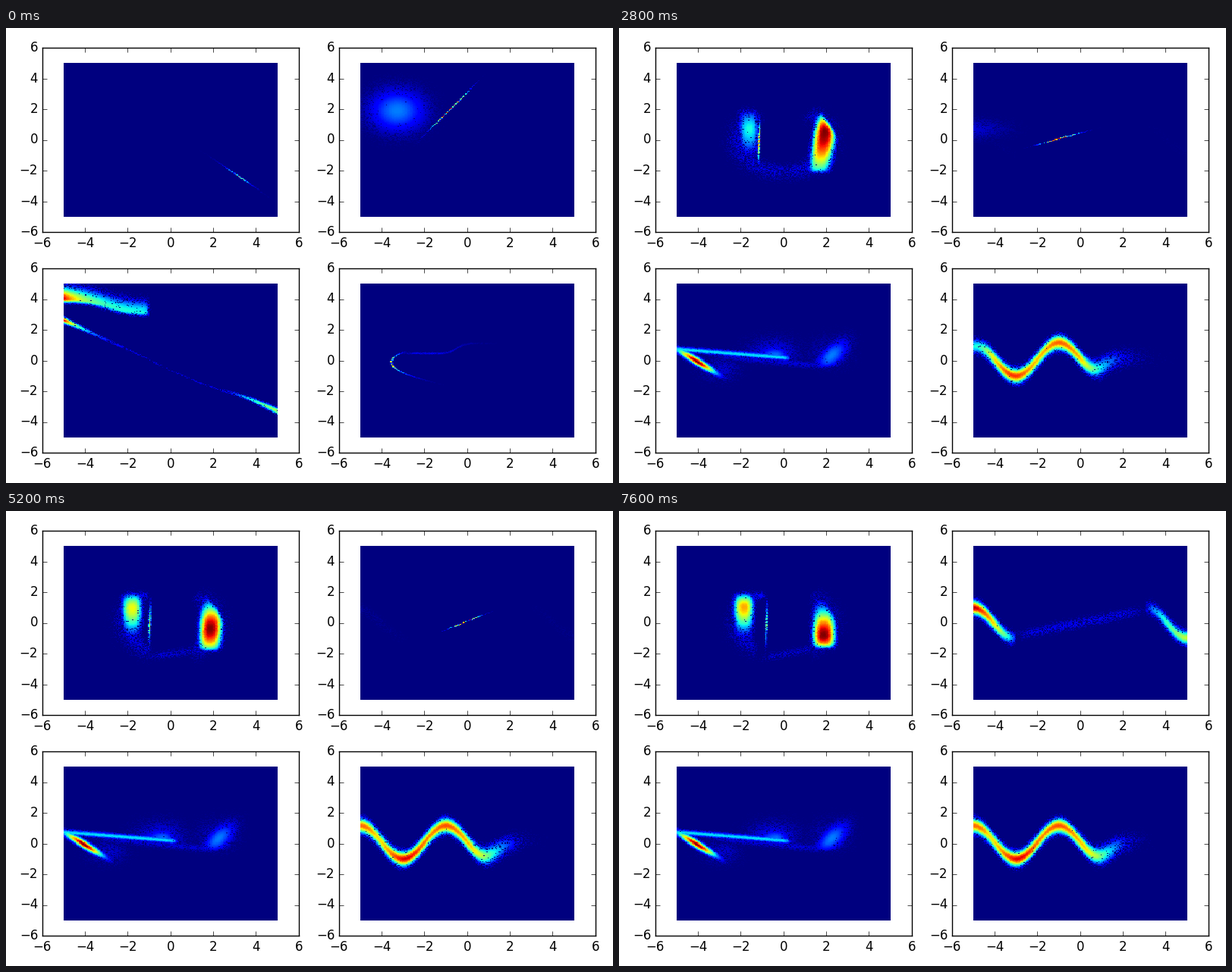
Animation of 800x600 px, one loop 8 s. Source, as a matplotlib script:

```python
import numpy as np
import matplotlib.pyplot as plt
from matplotlib.animation import FuncAnimation

plt.rcParams.update({
    "font.family": "DejaVu Sans", "font.size": 12, "text.kerning_factor": 6,
    "axes.linewidth": 1.0, "xtick.top": True, "ytick.right": True,
    "ytick.alignment": "center",
})
for axis in ("xtick", "ytick"):
    plt.rcParams.update({f"{axis}.direction": "in", f"{axis}.major.size": 4,
                         f"{axis}.major.width": 0.5, f"{axis}.major.pad": 4,
                         f"{axis}.labelsize": 12})

FRAMES, INTERVAL = 20, 400
BINS, LIMIT = 200, 5
STEP = 2 * LIMIT / BINS
CENTRES = -LIMIT + STEP * (np.arange(BINS) + 0.5)
GRID = np.array(np.meshgrid(CENTRES, CENTRES))


def ramp(n, begin, end):
    return float(np.clip((n - begin) / (end - begin), 0, 1))


def mix(a, b, t):
    return a + (b - a) * t


def bell(u, centre, low, high=None, power=2):
    """Bump with a separate width on each side."""
    d = u - centre
    width = np.where(d < 0, low, low if high is None else high)
    return np.exp(-0.5 * np.abs(d / width) ** power)


def edge(d, softness):
    """Soft step from 0 to 1."""
    return 0.5 + 0.5 * np.tanh(d / (2 * softness))


def blend(*layers):
    return np.maximum.reduce(layers)


# Each panel has density functions of (x, y); the values run from 0 to 1.

# --- top left: two upright modes joined by a ring ---------------------------

def modes_start(x, y):
    height = 0.5 * bell(x, 3.2, 0.3) + 0.1 * bell(x, 3.1, 0.7)
    return height * bell(y, 0.65 - 0.95 * x, 0.025)


def ring_haze(x, y):
    return 0.09 * bell(np.hypot(x, y), 2.05, 0.35, 0.45) * edge(np.abs(x) - 0.65 * y, 0.12)


def modes_early(x, y):
    flare = edge(y - 0.6, 0.35)
    column = (0.62 * edge(y + 1.95, 0.06) * bell(y, -0.6, 9, 1.4)
              * bell(x, 1.85 - 0.15 * flare, 0.18 + 0.32 * flare, power=3))
    core = 0.97 * bell(y, -0.8, 0.9, power=4) * bell(x, 1.93 + 0.05 * np.sin(2 * y), 0.07)
    floor = (0.3 + 0.25 * edge(x - 1.4, 0.2)) * bell(x, 0.2, 1.8, power=12) * bell(y, -1.85 - 0.11 * x, 0.08)
    stub = 0.32 * bell(x, -1.45, 0.1) * bell(y, -1.85, 0.25, 0.12)
    fan = 0.2 * bell(x, -1.6, 0.6, 0.1) * bell(y, -3.95 - 1.5 * x, 0.28)
    glow = 0.12 * bell(x, 0.2, 1.4, power=4) * bell(y, -1.8, 0.1, 0.35)
    return blend(column, core, floor, stub, fan, glow, ring_haze(x, y))


def modes_late(x, y, n):
    t, fall = ramp(n, 7, 15), ramp(n, 9, 15)
    left = (mix(0.38, 0.73, t) * bell(x, mix(-1.6, -1.84, t), 0.36, 0.32, power=3)
            * bell(y, mix(0.7, 1.05, t), 1.0, mix(0.85, 0.6, t)) * edge(1.95 - y, 0.12))
    right = (bell(x, 1.86 + 0.12 * (1 - fall) * y, 0.36, 0.42, power=3)
             * bell(y, mix(0.55, -0.8, fall), mix(1.9, 0.75, fall), mix(0.9, 1.1, fall))
             * edge(2.6 - 0.5 * np.maximum(y, 0) - x, 0.07)
             * edge(y + mix(2.1, 1.6, fall), 0.09))
    wall_x = mix(-1.15, -0.8, ramp(n, 7, 19))
    wall = (mix(0.7, 0.4, t) * bell(y, -0.1, 0.7) + 0.12 * bell(y, -0.1, 1.5, power=6)) \
        * bell(x, wall_x + 0.02 * y, 0.03)
    cap = 0.13 * bell(x, wall_x - 0.4, 0.5, 0.3, power=4) * bell(y, 1.75, 0.2)
    floor = (0.08 * bell(x, 0.3, 1.2, power=6)
             * bell(y, mix(-1.9, -2.05, t) + 0.27 * t * x, 0.2))
    return blend(left, right, wall, cap, floor, ring_haze(x, y) * edge(np.abs(x) - 1.3 * t, 0.1))


def modes(x, y, n):
    grown, late = ramp(n, 0, 1.5), ramp(n, 4, 7)
    field = blend((1 - grown) * modes_start(x, y),
                  grown * (1 - late) * modes_early(x, y),
                  late * modes_late(x, y, n))
    return field, mix(150, 9, grown)


# --- top right: a tilting line that opens into a wave -----------------------

def wave(x, y, n):
    opened, spread = ramp(n, 13, 15), ramp(n, 15, 19)
    cx = np.interp(n, [0, 4, 8], [-0.82, -3.4, -0.1])
    cy = np.interp(n, [0, 4, 8], [1.95, 0.22, 0.05])
    slope = np.interp(n, [0, 4, 8, 13, 15, 19], [1.39, 0.45, 0.33, 0.53, 0.39, 0.27])
    reach = np.interp(n, [0, 4, 8], [0.55, 0.95, 0.45])
    line = ((1 - opened) * bell(x, cx, reach) * bell(y, cy + slope * (x - cx), 0.014 * np.hypot(1, slope)))
    bridge = 0.1 * opened * bell(x, 0, 2.7, power=8) * bell(y, slope * x, mix(0.1, 0.25, spread))

    cloud = 0.25 * ramp(n, 3, 0) * bell(x, -3.27, 0.85) * bell(y, 1.9, 0.9)
    corner = 0.14 * ramp(n, 0, 4) * ramp(n, 10, 4) * bell(x, -5, 0.4 + 0.1 * n * ramp(n, 4, 7)) \
        * bell(y, mix(1.3, 0.7, ramp(n, 4, 7)), 0.45)

    # The two wings mirror each other through the origin.
    u, side = np.abs(x), np.sign(x)
    begin = mix(2.7, 3.0, spread)
    path = side * 0.97 * np.cos(np.pi / 2 * (u - begin - 0.1) / (3.95 - begin))
    height = np.where(side < 0, 0.97, 0.6) * np.clip((u - begin) / (5 - begin), 0, 1) ** 0.55
    wings = mix(0.025 * ramp(n, 4, 9), 1, opened) * height * bell(y, path, 0.3)
    return blend(line, bridge, cloud, corner, wings), mix(30, 9, opened)


# --- bottom left: folded arms and two clouds --------------------------------

def arms_start(x, y):
    decay = np.exp(-(x + 5) / 0.85)
    sheet = ((0.37 + 0.57 * decay) * edge(-1.05 - x, 0.05)
             * bell(y, 3.55 - 0.45 * np.tanh((x + 3) / 1.1), 0.15, 0.5))
    strand = ((0.08 + 0.87 * decay + 0.5 * edge(x - 3.6, 0.5))
              * bell(y, -0.6 - 0.65 * x + 0.55 * edge(x - 2.6, 0.5), 0.04 + 0.004 * x ** 2))
    return blend(sheet, strand)


def arms_grown(x, y, t):
    upper = (mix(0.77, 0.35, t) * edge(0.25 - x, 0.08)
             * bell(y, 0.17 - mix(0.06, 0.11, t) * x, mix(0.19, 0.1, t), mix(0.23, 0.12, t)))
    mid = mix(-4.3, -4.05, t)
    lower = (bell(x, mid, 0.6, mix(0.9, 0.58, t))
             * bell(y, mix(0.25, -0.05, t) - mix(1.08, 0.8, t) * (x - mid), mix(0.27, 0.17, t)))
    lump = (mix(0.97, 0.24, t) * bell(x, -0.35, 0.6, 0.38)
            * bell(y, 0.28, mix(0.22, 0.17, t), mix(0.42, 0.4, t)))
    lump_haze = mix(0.4, 0.11, t) * bell(x, -0.4, 0.9, 0.75) * bell(y, 0.35, 0.35, 0.75)
    cloud = (mix(0.37, 0.25, t) * bell(x, mix(1.5, 2.1, t) + 0.45 * t * y, mix(0.95, 0.38, t), mix(0.6, 0.42, t))
             * bell(y, mix(-0.1, 0.3, t), 0.6, 0.7)
             * edge(y + mix(0.6 + 0.15 * x, 0.45, t), 0.07))
    cloud_haze = 0.07 * bell(x, 2.3, 0.8, 0.6) * bell(y, 0.4, 0.6, 0.8)
    thread = 0.08 * bell(x, -0.7, 2.6, power=8) * bell(y, -0.1 - 0.14 * x, 0.17)
    tip_haze = 0.07 * bell(x, -2.9, 0.7, 0.6) * bell(y, -0.5, 0.6, 0.5)
    return blend(upper, lower, lump, lump_haze, cloud, cloud_haze, thread, tip_haze)


def arms(x, y, n):
    grown, settled = ramp(n, 0, 2), ramp(n, 4, 7)
    field = blend((1 - grown) * arms_start(x, y), grown * arms_grown(x, y, settled))
    return field, mix(8, 20, settled)


# --- bottom right: a sine band ----------------------------------------------

def band_start(x, y):
    d = y + 0.07
    bend = np.where(d < 0, 1.08, 1.6)
    nose = (0.75 * bell(d, 0, 0.5, 0.3) * edge(0.62 - d, 0.03)
            * bell(x, -3.55 + bend * d ** 2, 0.022 * np.hypot(1, 2 * bend * d)))
    tail = 0.11 * bell(x, -2.2, 0.5, 1.5) * bell(y, 0.45 + 0.65 * edge(x + 0.5, 0.18), 0.04)
    return blend(nose, tail)


def band_grown(x, y, t):
    path = (0.08 - 1.07 * np.sin(np.pi / 2 * np.minimum(x, 1))
            + 1.2 * edge(x - mix(0.8, 1.5, t), 0.35)
            - 0.4 * (1 - t) * edge(-4.6 - x, 0.2))
    crests = 0.7 + 0.27 * bell(x, mix(-3.3, -2.9, t), 0.6) + 0.13 * bell(x, -1, 0.5)
    left_end = mix(0.35, 1.32, t)
    height = (crests * mix(1, left_end, edge(-4.45 - x, 0.12))
              * bell(x, -0.05, 9, mix(0.62, 1.2, t), power=mix(1, 2, t)))
    return height * bell(y, path, 0.32 + 0.1 * edge(x - 0.8, 0.2))


def band(x, y, n):
    grown = ramp(n, 0, 2)
    field = blend((1 - grown) * band_start(x, y), grown * band_grown(x, y, ramp(n, 4, 13)))
    return field, mix(100, 8, grown)


# --- figure -----------------------------------------------------------------

PANELS = [(modes, 47.8, 331), (wave, 438.8, 331), (arms, 47.8, 40), (band, 438.8, 40)]

fig = plt.figure(figsize=(8, 6), dpi=100, facecolor="white")
images = []
for _, left, bottom in PANELS:
    ax = fig.add_axes([left / 800, bottom / 600, 337.9 / 800, 243 / 600])
    images.append(ax.imshow(np.zeros((BINS, BINS)), cmap="jet", vmin=0, vmax=1,
                            origin="lower", interpolation="nearest", aspect="auto",
                            extent=(-LIMIT, LIMIT, -LIMIT, LIMIT)))
    ax.set(xlim=(-6, 6), ylim=(-6, 6), xticks=range(-6, 7, 2), yticks=range(-6, 7, 2))


def sampled(density, n, rng):
    """Density at one random point per bin; bins that no sample hit stay empty."""
    x, y = GRID + STEP * (rng.random(GRID.shape) - 0.5)
    field, samples = density(x, y, n)
    hit = rng.random(field.shape) < 1 - np.exp(-samples * field)
    return np.where(hit, field, 0)


def update(n):
    for i, (image, (density, _, _)) in enumerate(zip(images, PANELS)):
        image.set_data(sampled(density, n, np.random.default_rng(100 * n + i)))
    return images


animation = FuncAnimation(fig, update, frames=FRAMES, interval=INTERVAL,
                          repeat=True, repeat_delay=0, blit=False)
plt.show()
```
